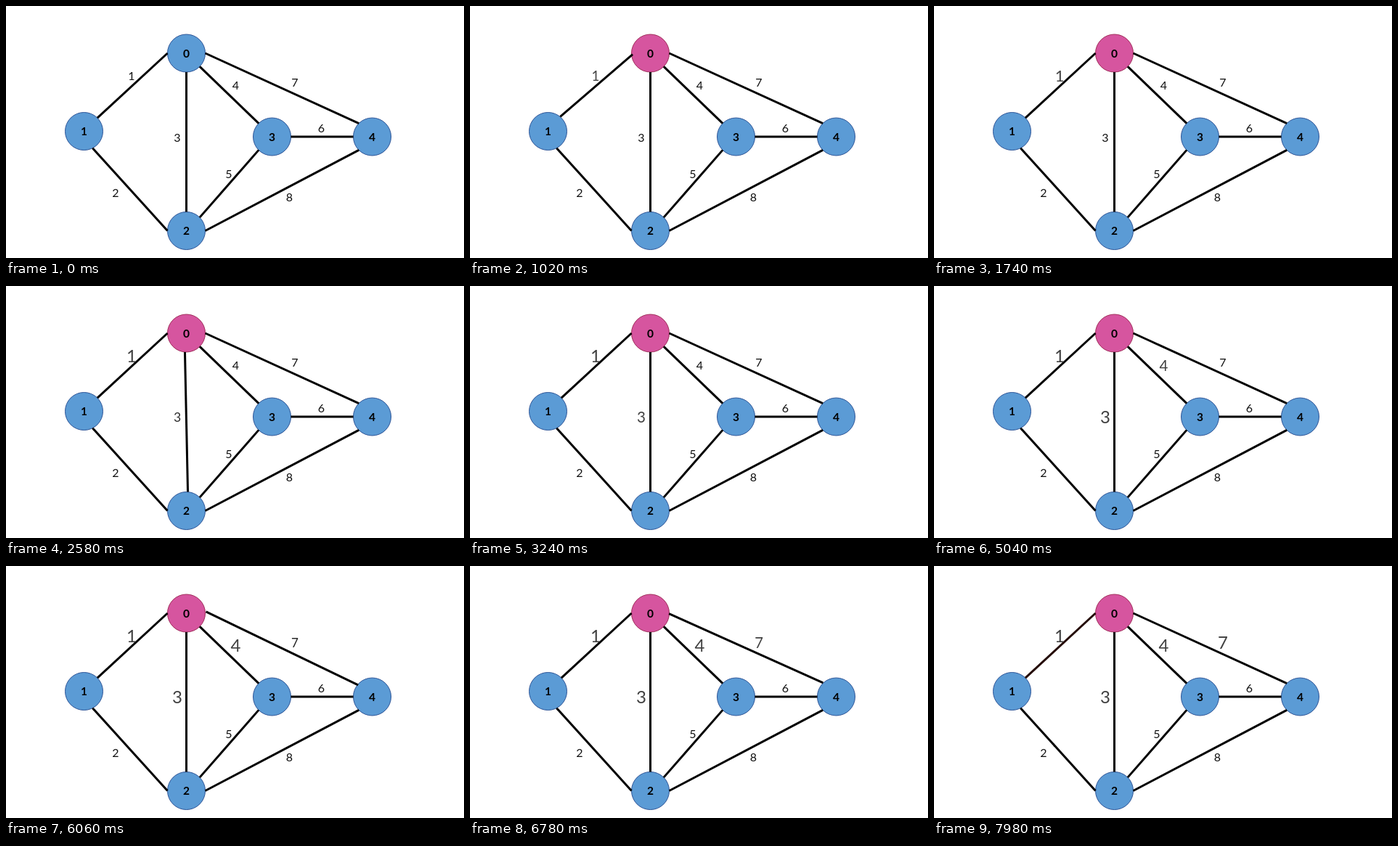
Write an HTML page that moves like this. It is 631 by 347 pixels and loops after 8 s.

```html
<!DOCTYPE html>
<html lang="en">
<head>
<meta charset="utf-8">
<title>Weighted graph</title>
<style>
  html, body { margin: 0; width: 100%; height: 100%; overflow: hidden; background: #fff; }
  svg { display: block; width: 631px; height: 347px; }
  text { font-family: Lato, "Noto Sans CJK SC", "Noto Sans", sans-serif; text-anchor: middle; }
  line { stroke: #000; stroke-width: 3; }
  circle { fill: #5b9bd5; stroke: #2f5597; stroke-width: 1; }
  .weight { font-size: 16px; fill: #111; }
  .name { font-size: 15.5px; font-weight: 700; fill: #000; }
</style>
</head>
<body>
<svg id="stage" viewBox="0 0 631 347"></svg>
<script>
const LOOP = 8000, STEP = 60;
const SLOT = 1800, FIRST = 420, TEETER = 1000, REDDEN = 2000;
const RADIUS = 26;
const stage = document.getElementById('stage');

const point = (x, y) => ({ x, y });
const nodes = [
  point(248.5, 65), point(107.5, 172.5), point(248.5, 309.5),
  point(366.5, 180), point(504.5, 180)
];

// Sides of a circle where edges attach, in eighths of a turn from the right
const E = 0, SE = 1, S = 2, SW = 3, W = 4, NW = 5, N = 6, NE = 7;

function site(node, side) {
  const turn = side * Math.PI / 4;
  return point(nodes[node].x + RADIUS * Math.cos(turn), nodes[node].y + RADIUS * Math.sin(turn));
}

function add(tag, attrs, text = '') {
  const el = document.createElementNS('http://www.w3.org/2000/svg', tag);
  for (const key in attrs) el.setAttribute(key, attrs[key]);
  el.textContent = text;
  return stage.appendChild(el);
}

let count = 0;
function edge(from, fromSide, to, toSide, label) {
  const a = site(from, fromSide), b = site(to, toSide);
  const line = add('line', { x1: a.x, y1: a.y, x2: b.x, y2: b.y });
  const text = add('text', { class: 'weight', y: 5.2 }, ++count);
  const middle = point((a.x + b.x) / 2, (a.y + b.y) / 2);
  const pose = (angle, size) => {
    line.setAttribute('transform', `rotate(${angle} ${middle.x} ${middle.y})`);
    text.setAttribute('transform', `translate(${label.x} ${label.y}) scale(${size})`);
  };
  pose(0, 1);
  return { from, line, text, pose };
}

const circles = nodes.map(({ x, y }) => add('circle', { cx: x, cy: y, r: RADIUS }));
nodes.forEach(({ x, y }, i) => add('text', { class: 'name', x, y: y + 5.8 }, i));

const edges = [
  edge(0, W, 1, NE, point(173, 97)),
  edge(1, SE + 0.4, 2, W, point(151, 258)),
  edge(0, S, 2, N, point(236, 181.5)),
  edge(0, SE, 3, NW, point(316.5, 110)),
  edge(2, NE, 3, SW, point(307, 232)),
  edge(3, E, 4, W, point(434.5, 169)),
  edge(0, E, 4, NW, point(398, 106)),
  edge(2, E, 4, SW, point(390.5, 264))
];
const visited = edges.filter(({ from }) => from === 0);

const clamp = v => Math.min(1, Math.max(0, v));
const mix = (a, b, p) => `rgb(${a.map((v, i) => Math.round(v + (b[i] - v) * p))})`;

// Degrees: quick lean, triangle wave, slow return
function teeter(p) {
  if (p < 0.2) return 2 * Math.min(1, p * 10);
  if (p > 0.8) return -10 * (1 - p);
  return 4 / Math.PI * Math.asin(Math.cos(5 * Math.PI * (p - 0.2)));
}

function draw(time) {
  const tint = clamp(time / FIRST);
  circles[0].style.fill = mix([91, 155, 213], [214, 85, 159], tint);
  circles[0].style.stroke = mix([47, 85, 151], [160, 45, 90], tint);

  visited.forEach(({ text, pose }, order) => {
    const age = time - FIRST - order * SLOT;
    const grow = clamp(age / SLOT);
    pose(teeter(clamp(age / TEETER)), 1 + grow / 2);
    text.style.fill = mix([17, 17, 17], [65, 65, 65], clamp(grow * 3));
  });

  const redden = clamp((time - FIRST - visited.length * SLOT) / REDDEN);
  visited[0].line.style.stroke = mix([0, 0, 0], [200, 60, 40], redden);
}

const start = performance.now();
function tick() {
  const time = (performance.now() - start) % LOOP;
  draw(Math.floor(time / STEP) * STEP);
  requestAnimationFrame(tick);
}
tick();
</script>
</body>
</html>
```
